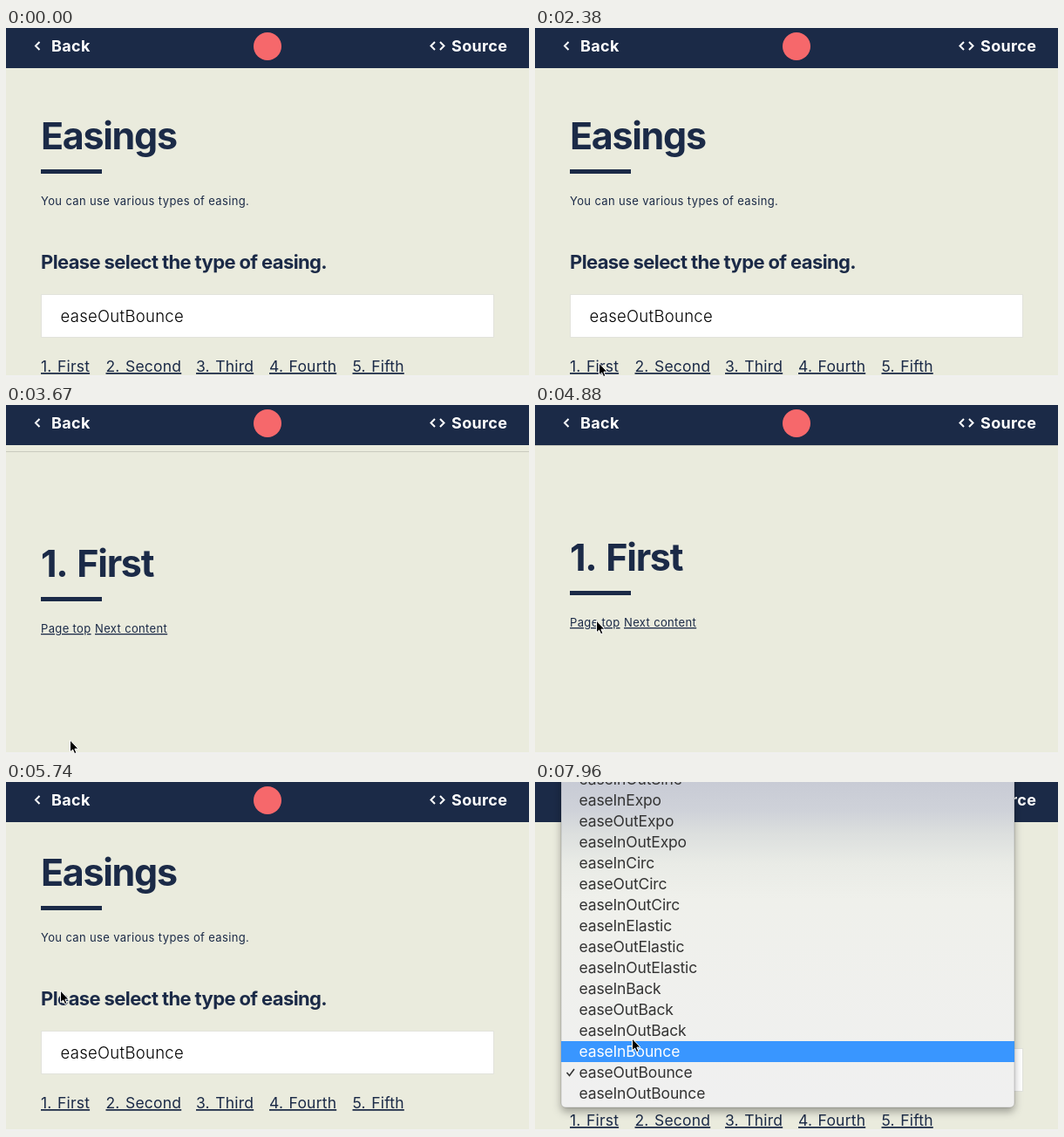
An HTML page for the animation above (7.99 s loop, 600 by 400 pixels).

```html
<!DOCTYPE html>
<html lang="en">
<head>
<meta charset="utf-8">
<title>Easings</title>
<style>
  html, body { margin: 0; width: 100%; height: 100%; overflow: hidden; background: #eaebdd; }
  svg { display: block; width: 100%; height: 100%; font-family: Inter, "Open Sans", sans-serif; fill: #1b2a47; }
  .title { font-size: 43px; font-weight: 700; letter-spacing: -1.3px; word-spacing: 3.5px; }
  .sub { font-size: 22px; font-weight: 700; letter-spacing: -.62px; }
  .small { font-size: 13px; letter-spacing: .36px; }
  .nav { font-size: 17.5px; letter-spacing: .2px; word-spacing: 1.3px; }
  .link { text-decoration: underline; text-decoration-thickness: 1px; text-underline-offset: 1.5px; }
  .link.active { text-decoration: none; }
  .value { font-size: 18.5px; font-weight: 300; letter-spacing: .3px; fill: #000; }
  .bar { font-size: 18px; font-weight: 700; letter-spacing: .35px; fill: #fff; }
  .icon { fill: none; stroke: #fff; stroke-width: 2; }
  .item { font-size: 17.5px; letter-spacing: -.15px; fill: #333; }
  .item.on { fill: #fff; }
</style>
</head>
<body>
<svg viewBox="0 0 600 400" xmlns="http://www.w3.org/2000/svg">
  <defs>
    <linearGradient id="glass" gradientUnits="userSpaceOnUse" x1="0" y1="0" x2="0" y2="373">
      <stop offset="0" stop-color="#c8cbd5"/>
      <stop offset=".09" stop-color="#cfd2d9"/>
      <stop offset=".16" stop-color="#dcdfde"/>
      <stop offset=".25" stop-color="#e9ebe6"/>
      <stop offset=".36" stop-color="#eff0eb"/>
      <stop offset="1" stop-color="#f0f0f0"/>
    </linearGradient>
    <filter id="shadow" filterUnits="userSpaceOnUse" x="0" y="-40" width="600" height="440">
      <feDropShadow dx="0" dy="5" stdDeviation="5" flood-color="#000" flood-opacity=".32"/>
    </filter>
  </defs>
  <rect width="600" height="400" fill="#eaebdd"/>

  <g id="page">
    <text class="title" x="40" y="139">Easings</text>
    <rect x="40" y="162" width="70" height="5"/>
    <text class="small" x="40" y="203">You can use various types of easing.</text>
    <text class="sub" x="40" y="276">Please select the type of easing.</text>
    <rect x="40.5" y="305.5" width="519" height="49" fill="#fff" stroke="#e2e3dc"/>
    <text class="value" x="62.5" y="337">easeOutBounce</text>
    <g id="nav" class="nav"></g>
    <rect y="503" width="600" height="1" fill="#c9cabf"/>
    <text class="title" x="40" y="647">1. First</text>
    <rect x="40" y="670" width="70" height="5"/>
    <text class="small link" id="top" x="40" y="711">Page top</text>
    <text class="small link" x="102" y="711">Next content</text>
  </g>
  <rect y="398" width="600" height="2" fill="#f0f0ef"/>

  <g>
    <rect width="600" height="46"/>
    <path class="icon" d="M38.5 16L34 20.5L38.5 25M492 16L487.5 20.5L492 25M498 16L502.5 20.5L498 25"/>
    <text class="bar" x="52" y="27">Back</text>
    <text class="bar" x="511" y="27">Source</text>
    <circle cx="300" cy="21" r="16" fill="#f6686b"/>
  </g>

  <g id="menu">
    <rect x="30" y="-20" width="520" height="393" rx="5" fill="url(#glass)" stroke="#000" stroke-opacity=".2" stroke-width=".8" filter="url(#shadow)"/>
    <rect id="hilite" x="30" width="520" height="24" fill="#3996ff"/>
    <g id="items"></g>
    <path id="check" d="M36.5 333L39.5 336.5L45 329" fill="none" stroke-width="1.6"/>
  </g>

  <path id="cursor" d="M.5 1V14.8L3.6 12L5.6 16.6L7.9 15.6L5.9 11.1H10Z" fill="#000" stroke="#fff" stroke-width="1"/>
</svg>
<script>
const LOOP = 7990, SCROLL = 457, SCROLL_MS = 955;
const DOWN_AT = 2760, UP_AT = 4913, OPEN_AT = 6990, HOVER_AT = 7850;
const ROW = 24, LAST_ROW = 345;

const $ = id => document.getElementById(id);

function addText(parent, cls, x, y, label) {
  const el = document.createElementNS("http://www.w3.org/2000/svg", "text");
  el.setAttribute("class", cls);
  el.setAttribute("x", x);
  el.setAttribute("y", y);
  el.textContent = label;
  parent.appendChild(el);
  return el;
}

const links = [["1. First", 40], ["2. Second", 114.5], ["3. Third", 218], ["4. Fourth", 302], ["5. Fifth", 397.5]]
  .map(([label, x]) => addText($("nav"), "link", x, 394, label));

const names = ["Sine", "Expo", "Circ", "Elastic", "Back", "Bounce"]
  .flatMap(kind => ["In", "Out", "InOut"].map(side => "ease" + side + kind))
  .slice(2);
const rowTop = i => LAST_ROW - (names.length - 1 - i) * ROW;
const items = names.map((name, i) => addText($("items"), "item", 50.5, rowTop(i) + 18, name));
const selected = names.indexOf("easeOutBounce");

// Cursor stops: time, x, y
const stops = [
  [1200, 216, 338], [1760, 138, 379], [1990, 107, 368], [2380, 73, 383],
  [3870, 73, 383], [4580, 70, 246], [4860, 70, 246], [5200, 63, 238],
  [6120, 62, 238], [6470, 112, 332], [6630, 108, 332], [7550, 108, 332],
  [7590, 106, 330], [7730, 106, 331], [7960, 111, 293]
];

function cursorAt(t) {
  const i = stops.findIndex(s => s[0] > t);
  if (i < 0) return stops[stops.length - 1].slice(1);
  const [t0, x0, y0] = stops[Math.max(i - 1, 0)], [t1, x1, y1] = stops[i];
  const p = Math.max(0, (t - t0) / (t1 - t0));
  const e = p * p * (3 - 2 * p);
  return [x0 + (x1 - x0) * e, y0 + (y1 - y0) * e];
}

function bounce(p) {
  if (p <= 0) return 0;
  if (p >= 1) return 1;
  const k = 7.5625, d = 2.75;
  if (p < 1 / d) return k * p * p;
  if (p < 2 / d) return k * (p - 1.5 / d) ** 2 + .75;
  if (p < 2.5 / d) return k * (p - 2.25 / d) ** 2 + .9375;
  return k * (p - 2.625 / d) ** 2 + .984375;
}

function scrollAt(t) {
  const moved = start => bounce((t - start) / SCROLL_MS);
  return Math.round(SCROLL * (moved(DOWN_AT) - moved(UP_AT)));
}

function draw(t) {
  $("page").setAttribute("transform", `translate(0 ${-scrollAt(t)})`);
  links[0].classList.toggle("active", t >= DOWN_AT && t < UP_AT - 30);
  $("top").classList.toggle("active", t >= UP_AT - 30 && t < OPEN_AT);

  $("menu").style.display = t >= OPEN_AT ? "" : "none";
  const on = t >= HOVER_AT ? selected - 1 : selected;
  $("hilite").setAttribute("y", rowTop(on));
  items.forEach((el, i) => el.classList.toggle("on", i === on));
  $("check").setAttribute("stroke", on === selected ? "#fff" : "#333");

  const [x, y] = cursorAt(t);
  $("cursor").style.display = t >= stops[0][0] ? "" : "none";
  $("cursor").setAttribute("transform", `translate(${Math.round(x)} ${Math.round(y)})`);
}

const began = performance.now();
function tick() {
  draw((performance.now() - began) % LOOP);
  requestAnimationFrame(tick);
}
tick();
</script>
</body>
</html>
```
